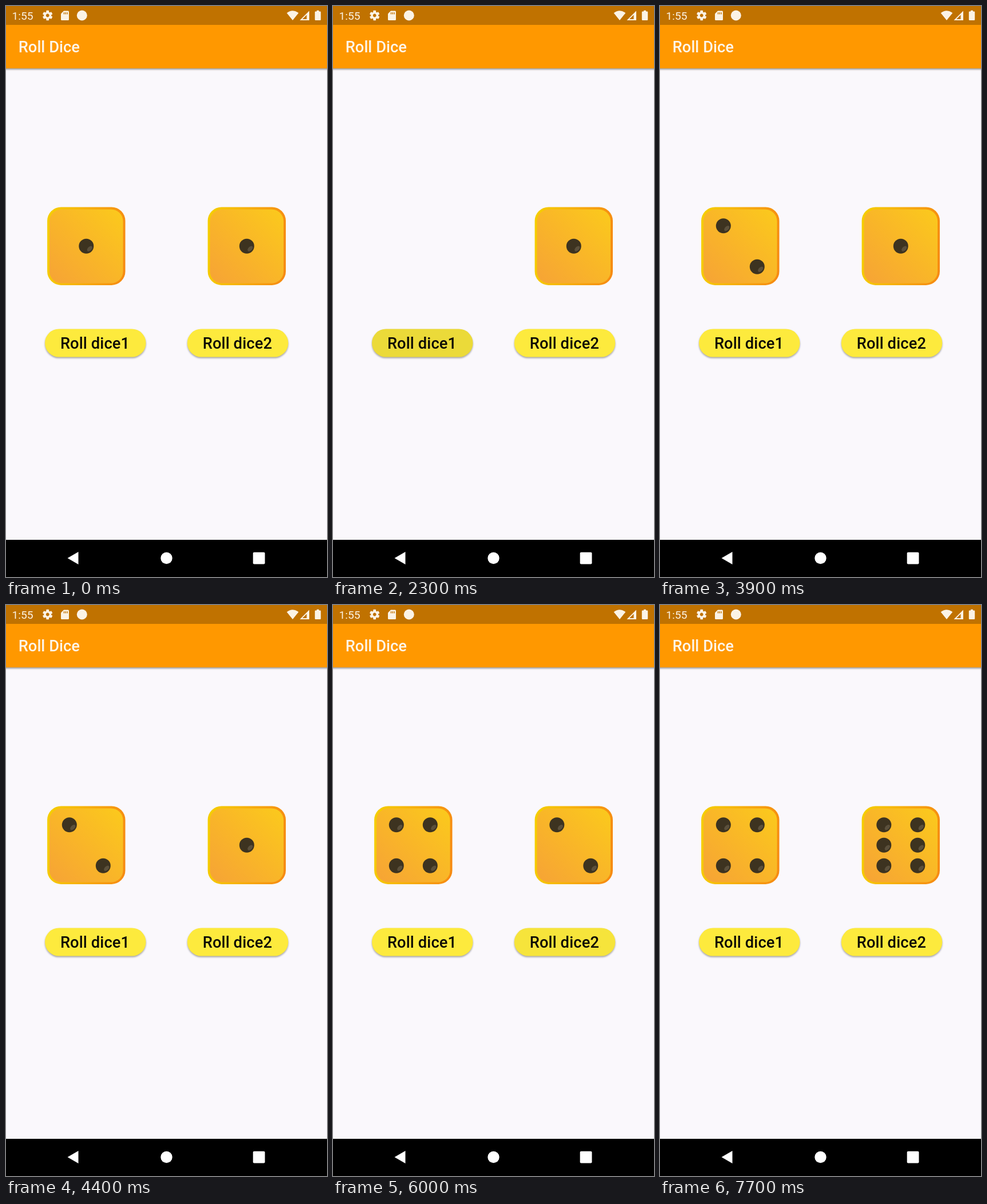
These frames come from a looping animation (561 px wide and 998 px high, 7800 ms). An HTML page:

```html
<!DOCTYPE html>
<html lang="en">
<head>
<meta charset="utf-8">
<title>Roll Dice</title>
<style>
  html, body { margin: 0; width: 100%; height: 100%; overflow: hidden; background: #faf8fc; }
  svg { display: block; width: 561px; height: 998px; }
  text { font-family: Roboto, sans-serif; }
  .label { font-size: 27.3px; font-weight: 500; }
</style>
</head>
<body>
<svg viewBox="0 0 561 998">
  <defs>
    <linearGradient id="rim" x1="0" y1=".45" x2="1" y2=".55">
      <stop offset="0" stop-color="#f5cd00"/>
      <stop offset=".35" stop-color="#f6b70a"/>
      <stop offset="1" stop-color="#f68b12"/>
    </linearGradient>
    <linearGradient id="face" x1="0" y1="1" x2="1" y2="0">
      <stop offset="0" stop-color="#f6a336"/>
      <stop offset=".5" stop-color="#f9b628"/>
      <stop offset="1" stop-color="#fbca1c"/>
    </linearGradient>
    <filter id="soft" x="-20%" y="-40%" width="140%" height="200%"><feGaussianBlur stdDeviation="1.7"/></filter>
    <filter id="wide" x="-20%" y="-60%" width="140%" height="240%"><feGaussianBlur stdDeviation="4.5"/></filter>
    <clipPath id="pill"><rect width="176.5" height="49" rx="24.5"/></clipPath>
    <g id="pip">
      <circle r="13" fill="#3d3320"/>
      <ellipse cx="6" cy="4.5" rx="5.6" ry="3.3" transform="rotate(-45 6 4.5)" fill="#5b503c"/>
    </g>
  </defs>

  <rect width="561" height="998" fill="#faf8fc"/>
  <rect x="-10" y="60" width="581" height="51" fill="#000" opacity=".38" filter="url(#soft)"/>
  <rect width="561" height="109" fill="#ff9800"/>
  <rect width="561" height="33" fill="#c07200"/>
  <text class="label" x="21.8" y="81" fill="#fdf6ea">Roll Dice</text>

  <g fill="#fbf3e6">
    <text x="10.5" y="23.8" font-size="19.2">1:55</text>
    <g id="gear" transform="translate(72.7 16.5)"></g>
    <path d="M101 8.5H108.500Q110 8.500 110 10V23.500Q110 25 108.500 25H97.500Q96 25 96 23.500V13.500Z"/>
    <path d="M101.500 11V14.500M104.300 11V14.500M107.100 11V14.500" stroke="#c07200" stroke-width="1.4"/>
    <circle cx="132.800" cy="16.500" r="9"/>
    <path d="M501 25L490.700 12.200Q501 4.200 511.300 12.200Z"/>
    <path fill-rule="evenodd" d="M513.500 25L530 8.500V25ZM518 23.100H525.500V15.600Z"/>
    <path d="M543 7.800H547V9.500H549Q550.200 9.500 550.200 10.700V23.800Q550.200 25 549 25H541Q539.800 25 539.800 23.800V10.700Q539.800 9.500 541 9.500H543Z"/>
  </g>

  <g id="stage"></g>

  <rect y="933" width="561" height="65" fill="#000"/>
  <g fill="#fff">
    <path d="M107.500 965L126.500 954V976Z"/>
    <circle cx="280.500" cy="965" r="10.200"/>
    <rect x="431.700" y="954.700" width="20.800" height="20.800" rx="2"/>
  </g>
</svg>
<script>
const LOOP = 7800, STEP = 100;
const FADE = 375, SPEED = 0.27;

// Button index, press and release times, touch point inside the button
const taps = [
  { btn: 0, down: 1900, up: 2150, x: 92 },
  { btn: 0, down: 2980, up: 3250, x: 92 },
  { btn: 0, down: 4500, up: 4700, x: 92 },
  { btn: 1, down: 5550, up: 5720, x: 92 },
  { btn: 1, down: 6400, up: 6600, x: 92 }
];

// [time, value] for each die; 0 leaves the place empty
const rolls = [
  [[0, 1], [2180, 0], [2450, 1], [3300, 2], [4750, 4]],
  [[0, 1], [5750, 2], [6650, 6]]
];

const NS = "http://www.w3.org/2000/svg";
const stage = document.getElementById("stage");

function add(parent, tag, attrs) {
  const el = document.createElementNS(NS, tag);
  for (const key in attrs) el.setAttribute(key, attrs[key]);
  return parent.appendChild(el);
}

function drawGear() {
  const gear = document.getElementById("gear");
  for (let a = 0; a < 360; a += 60) {
    add(gear, "rect", { x: -2.4, y: -8.7, width: 4.8, height: 5, rx: 0.8, transform: `rotate(${a})` });
  }
  add(gear, "circle", { r: 4.7, fill: "none", stroke: "#fbf3e6", "stroke-width": 3.6 });
}

// Each pip appears for the listed values
const pips = [
  [0, 0, [1, 3, 5]],
  [-29.5, -35.5, [2, 3, 4, 5, 6]],
  [29.5, 36, [2, 3, 4, 5, 6]],
  [29.5, -35.5, [4, 5, 6]],
  [-29.5, 36, [4, 5, 6]],
  [-29.5, 0, [6]],
  [29.5, 0, [6]]
];

function makeDie(cx) {
  const g = add(stage, "g", { transform: `translate(${cx} 419.7)` });
  add(g, "rect", { x: -68.2, y: -68.2, width: 136.4, height: 136.4, rx: 24, fill: "url(#rim)" });
  add(g, "rect", { x: -64.3, y: -64.3, width: 128.6, height: 129.2, rx: 21, fill: "url(#face)" });
  const dots = pips.map(([x, y]) => add(g, "use", { href: "#pip", x, y }));
  return value => {
    g.style.display = value ? "" : "none";
    dots.forEach((dot, i) => dot.style.display = pips[i][2].includes(value) ? "" : "none");
  };
}

function makeButton(x, label) {
  const g = add(stage, "g", { transform: `translate(${x} 564.5)` });
  const pill = { width: 176.5, height: 49, rx: 24.5 };
  add(g, "rect", { ...pill, y: 2, opacity: 0.34, filter: "url(#soft)" });
  const lift = add(g, "rect", { ...pill, y: 7, opacity: 0, filter: "url(#wide)" });
  add(g, "rect", { ...pill, fill: "#fdea3d" });
  const tint = add(g, "rect", { ...pill, opacity: 0 });
  const clip = add(g, "g", { "clip-path": "url(#pill)" });
  const ripple = add(clip, "circle", { cy: 25, r: 0, opacity: 0 });
  const text = add(g, "text", {
    class: "label", x: 87.6, y: 34.8, "text-anchor": "middle", "letter-spacing": 0.1, fill: "#0b0a05"
  });
  text.textContent = label;

  return (tap, t) => {
    const age = tap ? t - tap.down : 0;
    const fade = tap ? Math.min(1, Math.max(0, 1 - (t - tap.up) / FADE)) : 0;
    const raised = tap && t < tap.up ? Math.min(1, age / 150) : 0;
    lift.setAttribute("opacity", 0.32 * raised);
    tint.setAttribute("opacity", 0.02 * raised);
    ripple.setAttribute("cx", tap ? tap.x : 0);
    ripple.setAttribute("r", age * SPEED);
    ripple.setAttribute("opacity", 0.115 * fade);
  };
}

drawGear();
const dice = [makeDie(140.3), makeDie(420.8)];
const buttons = [makeButton(68, "Roll dice1"), makeButton(316.8, "Roll dice2")];

function render(t) {
  dice.forEach((show, i) => show(rolls[i].filter(([at]) => at <= t).pop()[1]));
  buttons.forEach((paint, i) => {
    paint(taps.find(p => p.btn === i && t >= p.down && t < p.up + FADE), t);
  });
}

const start = performance.now();
function tick() {
  const t = (performance.now() - start) % LOOP;
  render(Math.floor(t / STEP) * STEP);
  requestAnimationFrame(tick);
}
render(0);
tick();
</script>
</body>
</html>
```
